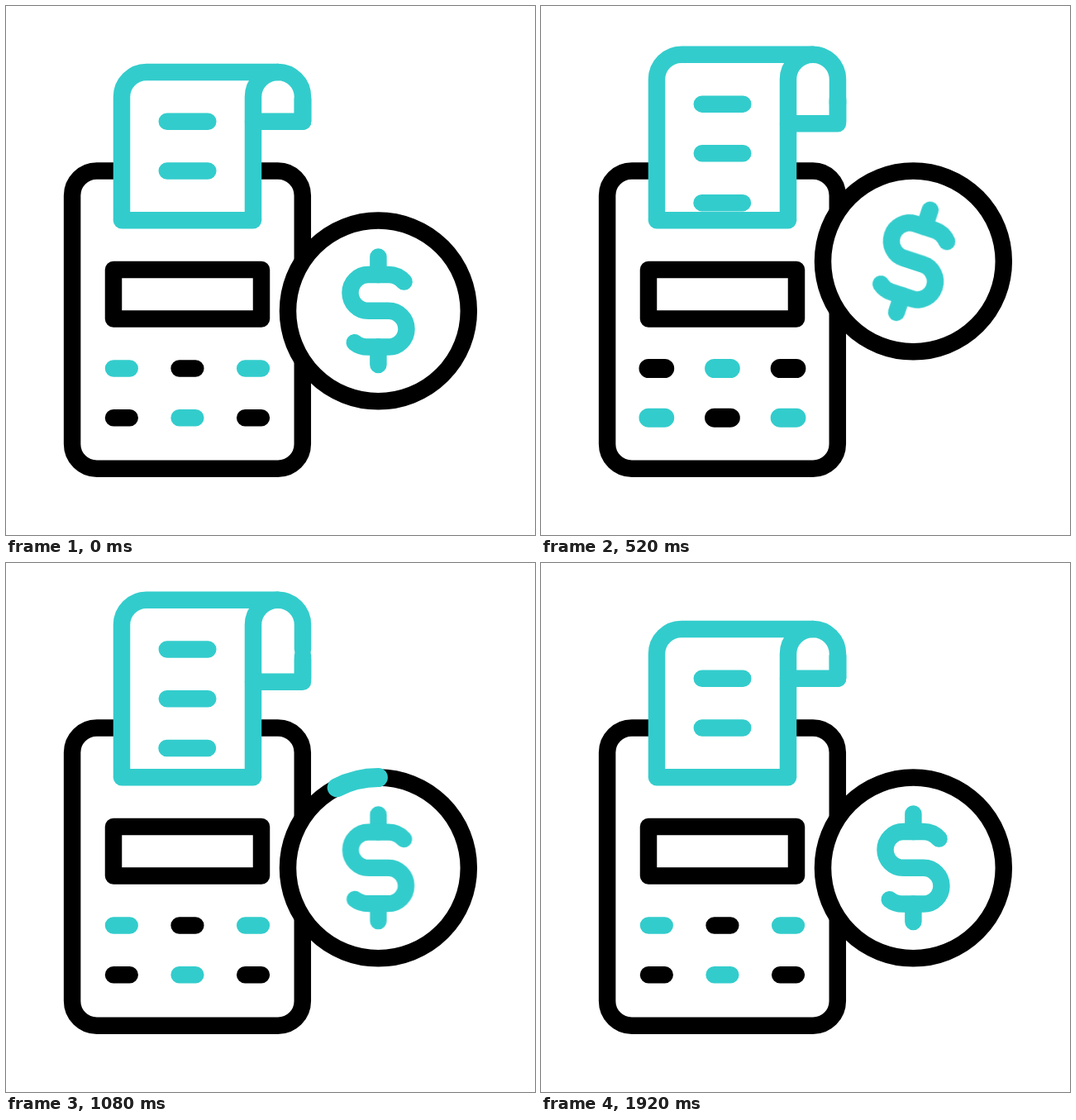
Write an HTML page without scripts that moves like this. It is 640 px wide and 640 px high and loops after 2000 ms.

```html
<!DOCTYPE html>
<html lang="en">
<head>
<meta charset="utf-8">
<title>Card terminal</title>
<style>
  @property --rise  { syntax: "<length>"; inherits: true; initial-value: 0px; }
  @property --lead  { syntax: "<length>"; inherits: true; initial-value: 0px; }
  @property --trail { syntax: "<length>"; inherits: true; initial-value: 0px; }

  :root { --teal: #3cc; --smooth: cubic-bezier(.333, 0, .667, 1); }
  html, body { margin: 0; width: 100%; height: 100%; overflow: hidden; background: #fff; }
  svg {
    display: block; width: 100%; height: 100%;
    fill: none; stroke-width: 20.5; stroke-linecap: round; stroke-linejoin: round;
  }
  .ink { stroke: #000; }
  .teal { stroke: var(--teal); }
  .white { fill: #fff; }

  .paper, .coin, .dollar, .pulse, .ring, .swap {
    animation: 2s var(--smooth) infinite;
  }

  .paper { animation-name: print; }
  .sheet { transform: translateY(var(--rise)); }
  .flap { transform: translateY(calc(var(--rise) * -.11)); }
  @keyframes print {
    0%, 4% { --rise: 0px; }
    18%, 24% { --rise: -18.2px; }
    32%, 50% { --rise: -36.4px; }
    88%, 100% { --rise: 0px; }
  }

  .coin { animation-name: bob; }
  @keyframes bob {
    0%, 4% { transform: translateY(0); }
    14% { transform: translateY(66px); }
    26% { transform: translateY(-60px); }
    52%, 100% { transform: translateY(0); }
  }

  .dollar, .pulse { transform-origin: 450.4px 368.9px; }
  .dollar { animation-name: sway; }
  @keyframes sway {
    0%, 4% { transform: rotate(0deg); }
    14% { transform: rotate(-15.7deg); }
    26% { transform: rotate(18.2deg); }
    42%, 100% { transform: rotate(0deg); }
  }
  .pulse { animation-name: pulse; }
  @keyframes pulse {
    0%, 50% { transform: scale(1); }
    62% { transform: scale(.955); }
    82%, 100% { transform: scale(1); }
  }

  .ring {
    stroke-width: 23;
    stroke-dasharray: calc(var(--lead) - var(--trail)) 720px;
    stroke-dashoffset: calc(var(--trail) * -1);
    animation-name: lead, trail, show;
    animation-timing-function: var(--smooth), linear, step-end;
  }
  @keyframes lead {
    0%, 50% { --lead: 0px; }
    74%, 100% { --lead: 360px; }
  }
  @keyframes trail {
    0% { --trail: 0px; }
    60% { --trail: 0px; animation-timing-function: cubic-bezier(.333, 0, .667, .333); }
    66% { --trail: 35px; }
    80% { --trail: 188px; }
    88% { --trail: 289px; animation-timing-function: cubic-bezier(.333, .45, .667, .9); }
    96%, 100% { --trail: 360px; }
  }
  @keyframes show {
    0% { visibility: hidden; }
    50.5% { visibility: visible; }
    96%, 100% { visibility: hidden; }
  }

  .swap { stroke-width: 23; animation-name: swap; animation-timing-function: step-end; }
  @keyframes swap {
    0% { visibility: hidden; }
    20% { visibility: visible; }
    32%, 100% { visibility: hidden; }
  }
</style>
</head>
<body>
<svg viewBox="0 0 640 640">
  <defs>
    <path id="odd" d="M130 438.5h19.7M289.2 438.5h19.7M209.6 498.2h19.7"/>
    <path id="even" d="M209.6 438.5h19.7M130 498.2h19.7M289.2 498.2h19.7"/>
    <clipPath id="slot"><path d="M0 0H640V259H0z"/></clipPath>
  </defs>

  <g class="ink">
    <rect class="white" x="80.1" y="199.5" width="278.7" height="360.3" rx="29.8"/>
    <rect x="130" y="319" width="179" height="59.6"/>
  </g>

  <use href="#odd" class="teal"/>
  <use href="#even" class="ink"/>
  <g class="swap">
    <use href="#odd" class="ink"/>
    <use href="#even" class="teal"/>
  </g>

  <g class="paper teal">
    <path class="white" stroke="none" d="M140 110H299V259H140z"/>
    <g clip-path="url(#slot)">
      <g class="sheet">
        <path d="M140 310V110a30 30 0 0 1 30-30H329"/>
        <path d="M299 310V110a30 30 0 0 1 60 0V139.7"/>
        <path d="M194.8 139.8h49.5M194.8 199.5h49.5M194.5 259.3h49.5"/>
      </g>
    </g>
    <path d="M359 112V139.7"/>
    <path class="flap" d="M359 112V139.8H299"/>
    <path d="M140 259.2H299"/>
  </g>

  <g class="coin">
    <circle class="ink white" cx="450.4" cy="368.9" r="109.4"/>
    <!-- Mirrored so the arc runs counter-clockwise from the top -->
    <g transform="translate(450.4 368.9) scale(-1 1) rotate(-90)">
      <circle class="ring teal" r="109.4" pathLength="360"/>
    </g>
    <g class="dollar">
      <g class="pulse teal">
        <path d="M450.4 303.6V325M450.4 412.5V433.9"/>
        <path d="M481.6 333.6Q474 325 462.6 325H438.4a21.9 21.9 0 0 0 0 43.8H462.6a21.9 21.9 0 0 1 0 43.8H438.4Q428.5 412.6 421.7 407.2"/>
      </g>
    </g>
  </g>
</svg>
</body>
</html>
```
